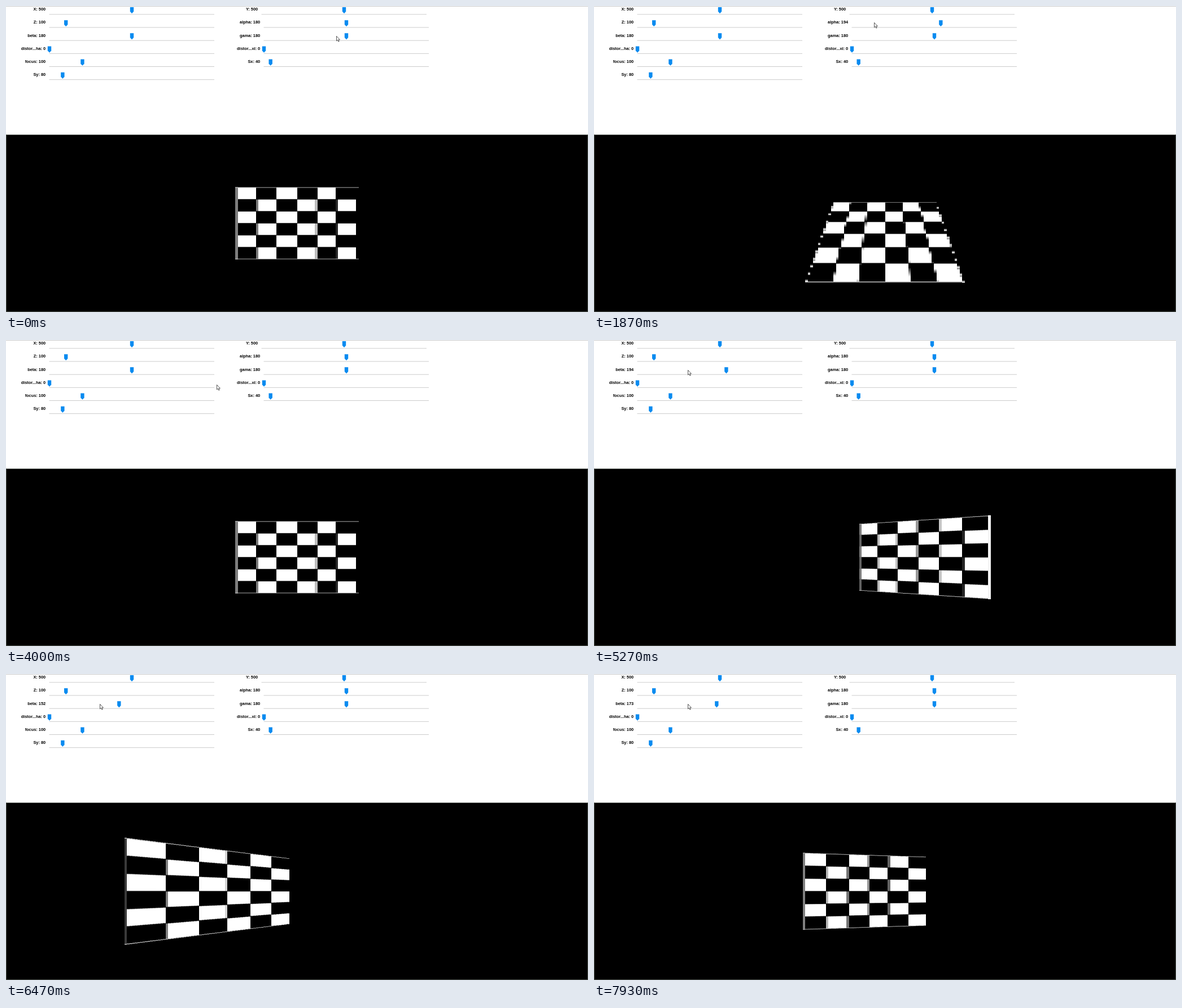
Recreate the animation shown at these times as an HTML page with a canvas. Size 1031x543 px, loop 8 s.

```html
<!DOCTYPE html>
<html lang="en">
<head>
<meta charset="utf-8">
<title>Camera sliders</title>
<style>
  html, body { margin: 0; width: 100%; height: 100%; overflow: hidden; background: #fff; }
  svg, canvas { position: absolute; left: 0; display: block; }
  svg { top: 0; }
  canvas { top: 228px; width: 1031px; height: 315px; image-rendering: pixelated; }
  .frame { position: absolute; left: 0; top: 228px; width: 1029px; height: 313px;
    border: 1px solid #4a4f4a; border-top-color: #707570; }
  text { font: bold 7.4px "Liberation Sans", Arial, sans-serif; text-anchor: end; fill: #000; }
  .track { fill: #ccc; }
  .knob { fill: #0a8bf0; }
  .cursor { fill: #fff; stroke: #444; stroke-width: .9; stroke-linejoin: round; }
</style>
</head>
<body>
<canvas id="view" width="226" height="315"></canvas>
<div class="frame"></div>
<svg id="ui" width="1031" height="543">
  <rect width="1031" height="1" fill="#ccc"/>
</svg>
<script>
const LOOP = 8000, TICK = 200 / 3;
const ui = document.getElementById('ui');
const view = document.getElementById('view');
const ctx = view.getContext('2d');
const W = view.width, H = view.height, PW = 1031 / W;
const pixels = ctx.createImageData(W, H);
const clamp = v => Math.max(0, Math.min(1, v));
const lerp = (a, b, f) => a + (b - a) * f;

function add(tag, attrs) {
  const el = document.createElementNS('http://www.w3.org/2000/svg', tag);
  for (const key in attrs) el.setAttribute(key, attrs[key]);
  return ui.appendChild(el);
}

// Sliders fill two columns, left to right
let count = 0;
function slider(label, value, max) {
  const col = count % 2, row = count++ >> 1;
  const x0 = col ? (row ? 457 : 453) : 77;
  const y = row * 23.15;
  const text = add('text', { x: x0 - 6.8, y: 8.3 + y });
  add('rect', { class: 'track', x: x0 - .5, y: 14.4 + y, width: 292.5, height: 1 });
  const knob = add('path', { class: 'knob', d: 'M-3.2 2H3.2V9.8L0 13.2L-3.2 9.8Z' });
  const set = v => {
    text.textContent = `${label}: ${v}`;
    knob.setAttribute('transform', `translate(${x0 + 292 * v / max} ${y})`);
  };
  set(value);
  return set;
}

slider('X', 500, 1000);
slider('Y', 500, 1000);
slider('Z', 100, 1000);
const setAlpha = slider('alpha', 180, 360);
const setBeta = slider('beta', 180, 360);
slider('gama', 180, 360);
slider('distor...ha', 0, 100);
slider('distor...xi', 0, 100);
slider('focus', 100, 500);
slider('Sx', 40, 1000);
slider('Sy', 80, 1000);

const cursor = add('path', {
  class: 'cursor',
  d: 'M.5 .5V9L2.4 7.3L3.9 10.3L5.2 9.7L3.8 6.8H6.4Z'
});

// Board texture, u and v in 0..1: thin outline plus 6 x 6 checks
const MARGIN = .005, PITCH = (1 - 2 * MARGIN) / 6, SOFT = .0075;

const outline = d => Math.min(clamp((d - .0005) / .005), clamp((.0088 - d) / .003));

function checkEdge(s) {
  const f = s - Math.floor(s);
  return clamp((Math.min(f, 1 - f) * PITCH + .001) / SOFT);
}

function board(u, v) {
  if (u < 0 || u > 1 || v < 0 || v > 1) return 0;
  const du = Math.min(u, 1 - u), dv = Math.min(v, 1 - v);
  const line = Math.max(outline(du), outline(dv * .8));
  const s = (u - MARGIN) / PITCH, t = (v - MARGIN) / PITCH;
  const i = Math.floor(s), j = Math.floor(t);
  if (i < 0 || i > 5 || j < 0 || j > 5 || (i + j) % 2) return line;
  return Math.max(line, checkEdge(s) * checkEdge(t));
}

// Cast rays per coarse pixel onto the plane turned about the camera
const FX = 236, FY = 74.4, HALF_W = .4557, HALF_H = .864, TURN = .988;

function render(alpha, beta) {
  const a = (alpha - 180) * Math.PI / 180, b = (beta - 180) * TURN * Math.PI / 180;
  const ca = Math.cos(a), sa = Math.sin(a), cb = Math.cos(b), sb = Math.sin(b);
  const sample = (px, py) => {
    const rx = (px - 515.2) / FX, ry = (py - H / 2) / FY;
    const y = ry * ca - sa, depth = ry * sa + ca;
    const x = rx * cb - depth * sb, z = rx * sb + depth * cb;
    return z > 0 ? board((x / z / HALF_W + 1) / 2, (y / z / HALF_H + 1) / 2) : 0;
  };
  for (let j = 0, p = 0; j < H; j++) {
    for (let i = 0; i < W; i++, p += 4) {
      const px = (i + .5) * PW;
      const c = 127.5 * (sample(px, j + .25) + sample(px, j + .75));
      pixels.data.set([c, c, c, 255], p);
    }
  }
  ctx.putImageData(pixels, 0, 0);
}

// Sliders are dragged between [time, angle] keys and snap to 7 degrees
const SNAP = 7;
const alphaKeys = [[960, 180], [1560, 201], [1640, 194], [1930, 194], [2465, 166], [3000, 166], [3270, 180]];
const betaKeys = [[4795, 180], [5335, 194], [5665, 194], [6330, 159], [6400, 159],
  [6665, 145], [6900, 145], [7500, 166], [7800, 166], [7930, 173]];

function angleAt(keys, t) {
  let angle = keys[0][1];
  for (let k = 1; k < keys.length; k++) {
    const [t0] = keys[k - 1], [t1, to] = keys[k];
    angle = lerp(angle, to, clamp((t - t0) / (t1 - t0)));
  }
  return 180 + SNAP * Math.round((angle - 180) / SNAP);
}

// Two pointer trips: a straight glide, then a fast arc that settles
function pointerAt(t) {
  const glide = clamp((t - 65) / 665);
  const swing = 1 - (1 - clamp((t - 3935) / 665)) ** 4.5;
  return [
    lerp(lerp(585, 495.5, glide), 165.5, swing),
    lerp(lerp(53, 28.5, glide), 52.5, swing) + 180 * swing * (1 - swing)
  ];
}

let shown = '';
function draw(now) {
  const t = now % LOOP;
  const alpha = angleAt(alphaKeys, t), beta = angleAt(betaKeys, t);
  const key = alpha + ',' + beta;
  if (key !== shown) {
    shown = key;
    setAlpha(alpha);
    setBeta(beta);
    render(alpha, beta);
  }
  const [x, y] = pointerAt(Math.floor((t + 2) / TICK) * TICK);
  cursor.setAttribute('transform', `translate(${Math.round(x)} ${Math.round(y)})`);
}

const start = performance.now();
function loop() {
  draw(performance.now() - start);
  requestAnimationFrame(loop);
}
loop();
</script>
</body>
</html>
```
